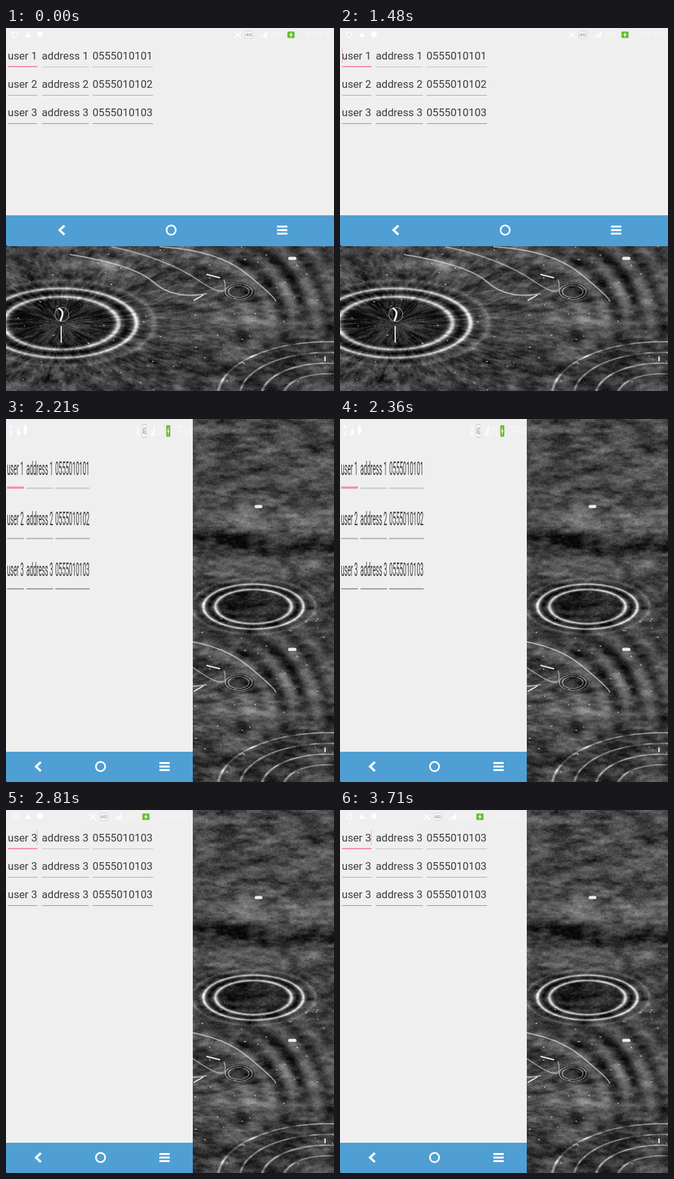
Animation, 511 px wide and 564 px high, one loop 3.96 s. Source, as an HTML page with a canvas:

```html
<!DOCTYPE html>
<html lang="en">
<head>
<meta charset="utf-8">
<title>Screen rotation</title>
<style>
  html, body { margin: 0; width: 100%; height: 100%; overflow: hidden; background: #333; }
  canvas, #phone { position: absolute; left: 0; top: 0; }
  text { font-family: Roboto, "Noto Sans", "Noto Sans CJK TC", sans-serif; white-space: pre; }
  .row text { font-size: 16.7px; }
</style>
</head>
<body>
<canvas id="water" width="511" height="564"></canvas>
<svg id="phone" width="511" height="564" viewBox="0 0 511 564"></svg>
<script>
const LOOP = 3960;
const BG = '#efefef', BLUE = '#4f9fd4', PINK = '#f48fb1';
const phoneNumber = n => '055501010' + n;

// when each scene begins, and when the text cursor is lit
const SCENES = [[0, 'wide'], [2210, 'squeezed'], [2660, 'tilted'], [2810, 'tall']];
const CURSOR_ON = [[450, 890], [1480, 1920], [2810, 3260], [3710, LOOP]];

/* ---------- phone ---------- */
const rect = (x, y, w, h, fill, more = '') =>
  `<rect x="${x}" y="${y}" width="${w}" height="${h}" fill="${fill}" ${more}/>`;
const label = (x, y, s, fill, more = '') =>
  `<text x="${x}" y="${y}" fill="${fill}" ${more}>${s}</text>`;
const group = (transform, body) => `<g transform="${transform}">${body}</g>`;

function field(x, w, s, line, h = 1) {
  return label(x - .3, 49.1, s, '#3c3c3c') + rect(x, 61 - h, w, h, line);
}
function rows(ids) {
  return ids.map((n, i) => {
    const line = `hsl(0 0% ${76 - 9 * i}%)`;
    return `<g class="row" transform="translate(0 ${44 * i})">` +
      field(3, 46, 'user ' + n, i ? line : PINK, i ? 1 : 2) +
      field(56, 73, 'address ' + n, line) +
      field(135, 94, phoneNumber(n), line) + `</g>`;
  }).join('');
}

function statusBar(dx) {
  const bars = [2, 4.5, 7, 9.5].map((h, i) => rect(396 + i * 3, 15 - h, 2, h, '#fff')).join('');
  return `<circle cx="14" cy="10" r="4" fill="none" stroke="#fff" stroke-width="1.5"/>
    <path d="M29 14L34 6L39 14Z" fill="#fff"/><circle cx="53" cy="9.5" r="4.5" fill="#fff"/>` +
    group(`translate(${dx})`,
      `<path d="M356 6L366 15M356 15L366 6" stroke="#fff" stroke-width="1.5"/>` +
      rect(372.5, 5, 12, 11, '#f8f8f8', 'stroke="#d4d4d4" rx="1"') +
      label(373.2, 13.4, '4G', '#aaa', 'font-size="8" font-weight="700"') + bars +
      label(412, 14, '25%', '#f8f8f8', 'font-size="10"') +
      rect(438.5, 5.5, 11, 10, '#62bd28', 'rx="1"') +
      `<path d="M445 6.5L441 11H443.5L442.5 15L447 10H444.5Z" fill="#fff"/>` +
      label(465, 14, '下午 8:43', '#f8f8f8', 'font-size="10"'));
}

// buttons sit at one sixth, one half and five sixths of the bar
function nav(y, w) {
  const button = (k, body) => group(`translate(${w * k + .8} ${y + 23})`, body);
  return rect(0, y, 5, 48, '#111') +
    `<path d="M0 ${y}H${w}V${y + 48}H4Q0 ${y + 48} 0 ${y + 44}Z" fill="${BLUE}"/>` +
    button(1 / 6, `<path d="M5 -7L-2.5 0L5 7" fill="none" stroke="#fff" stroke-width="3.6"/>`) +
    button(1 / 2, `<circle cx="1" r="7.2" fill="none" stroke="#fff" stroke-width="2.5"/>`) +
    button(5 / 6, [-7, -1.5, 4].map(k => rect(-4.3, k, 16, 3, '#fff')).join(''));
}

const cursor = x => rect(x, 32, 1, 22, PINK, 'class="cursor" opacity=".8"');
const scene = (id, body) => `<g id="${id}" visibility="hidden">${body}</g>`;
const portrait = (id, body) =>
  scene(id, rect(0, 0, 291, 517, BG) + `<svg width="291" height="517">${body}</svg>` + nav(517, 291));

const before = rows([1, 2, 3]) + statusBar(0);
const after = rows([3, 3, 3]) + statusBar(-226);
const squashed = group(`scale(${291 / 511} ${517 / 291})`, before);

document.getElementById('phone').innerHTML =
  scene('wide', rect(0, 0, 511, 291, BG) + before + cursor(3) + nav(291, 511)) +
  portrait('squeezed', squashed) +
  portrait('tilted', rect(0, 0, 291, 517, '#000') + group('rotate(-5.8 145.5 258.5)',
    rect(-9, 0, 309, 510, '#141414') + rect(0, 0, 291, 510, BG) +
    `<g opacity=".07">${squashed}</g>` + after)) +
  portrait('tall', after + cursor(48));

/* ---------- rippled water backdrop ---------- */
const { sin, cos, exp, floor, hypot, max, abs, PI } = Math;
const hash = (i, j) => { const s = sin(i * 127.1 + j * 311.7) * 43758.5453; return s - floor(s); };
const ease = k => k * k * (3 - 2 * k);
const mix = (a, b, k) => a + (b - a) * k;
const step = (a, b, x) => ease(Math.min(1, max(0, (x - a) / (b - a))));
const bump = (x, w) => exp(-x * x / (w * w));

// smooth noise in -1..1
function noise(x, y) {
  const i = floor(x), j = floor(y), u = ease(x - i), v = ease(y - j);
  return 2 * mix(mix(hash(i, j), hash(i + 1, j), u), mix(hash(i, j + 1), hash(i + 1, j + 1), u), v) - 1;
}

// dark core, two bright crests, then waves that die away
function ripple(x, y, cx, cy, rx, ry) {
  const sx = (x - cx) / rx, d = hypot(sx, (y - cy) / ry);
  if (d > 2) return 0;
  const wave = cos(2 * PI * (d - 1) / .24);
  const crest = wave > 0 ? 115 * wave * wave * (1 + .4 * sx * sx) : 45 * wave;
  return mix(-42 + 25 * bump(d, .4), crest * exp(-7 * max(0, d - 1)), step(.62, .72, d));
}

// thin concentric lines in the lower right corner
function fan(x, y) {
  const d = hypot((x - 500) / 170, (y - 570) / 83);
  if (d < .25 || d > 1.1) return 0;
  return 150 * max(0, cos(2 * PI * (d - 1) / .2)) ** 14 * (.6 + .5 * noise(x / 12, y / 6)) - 12;
}

// broad diagonal bands
function swell(x, y) {
  const fade = bump(x - 435, 95) * bump(y - 395, 60);
  return -42 * fade * cos(2 * PI * hypot(x - 300, y - 480) / 34);
}

function brightness(x, y) {
  const low = step(315, 355, y);
  const bands = 32 * bump(y - 158, 24) - 50 * bump(y - 190 - 8 * sin((x - 370) / 60), 13) +
    25 * bump(y - 222, 14);
  const turn = Math.atan2((y - 458) * 2.2, x - 85), away = hypot(x - 85, (y - 458) * 2.2);
  const choppy = 26 * noise(x / 16, y / 6) + 14 * noise(x / 6, y / 3);
  const streaks = 26 * noise(turn * 16, away / 22) + 22 * noise(turn * 40, away / 10);
  const glow = 55 * bump(x - 345, 75) * bump(y - 457, 9) + 70 * bump(x - 160, 28) * bump(y - 367, 8);
  return 70 + bands + mix(choppy, streaks, low) + 20 * noise(x / 34, y / 16) +
    14 * noise(x / 1.7, y / 1.5) + glow + swell(x, y) + fan(x, y) +
    ripple(x, y, 85, 458, 118, 54) + ripple(x, y, 385, 291, 78, 35) +
    ripple(x, y, 362, 409, 21, 12) * .6;
}

function paintWater() {
  const { canvas, ...rest } = {};
  const ctx = document.getElementById('water').getContext('2d');
  const w = 511, h = 564, img = ctx.createImageData(w, h);
  for (let i = 0; i < w * h; i++) {
    const v = max(8, brightness(i % w, floor(i / w)));
    img.data.set([v, v, v, 255], i * 4);
  }
  ctx.putImageData(img, 0, 0);

  ctx.lineCap = 'round';
  const stroke = (path, width, alpha = 1) => {
    ctx.lineWidth = width;
    ctx.strokeStyle = `rgba(235,235,235,${alpha})`;
    ctx.stroke(new Path2D(path));
  };
  // long glints
  stroke('M100 352Q200 368 230 395T312 413', 2.2, .6);
  stroke('M165 340Q250 358 300 392T340 392', 1.8, .5);
  stroke('M240 340Q330 345 375 382T420 424', 2.2, .6);
  // bubble and drops
  stroke('M76 445a11 11 0 1 0 22 0a11 11 0 1 0 -22 0', 1, .6);
  stroke('M83 436Q92 440 85 454', 3);
  stroke('M86 464V488', 1.8);
  stroke('M390 136H397M442 358H450', 5);
  stroke('M313 383L333 388M293 423L307 415M497 511V517', 2);
  // flecks
  for (let i = 0; i < 80; i++) {
    const x = 511 * hash(i, 3), y = 300 + 264 * hash(i, 8);
    stroke(`M${x} ${y}l${2 * hash(i, 5)} .5`, 1.2, .9);
  }
}
paintWater();

/* ---------- playback ---------- */
const scenes = [...document.querySelectorAll('#phone > g')];
const cursors = [...document.querySelectorAll('.cursor')];

function tick() {
  const t = performance.now() % LOOP;
  const [, id] = SCENES.findLast(([start]) => start <= t);
  const lit = CURSOR_ON.some(([from, to]) => t >= from && t < to);
  scenes.forEach(s => s.setAttribute('visibility', s.id === id ? 'visible' : 'hidden'));
  cursors.forEach(c => c.setAttribute('display', lit ? 'inline' : 'none'));
  requestAnimationFrame(tick);
}
tick();
</script>
</body>
</html>
```
